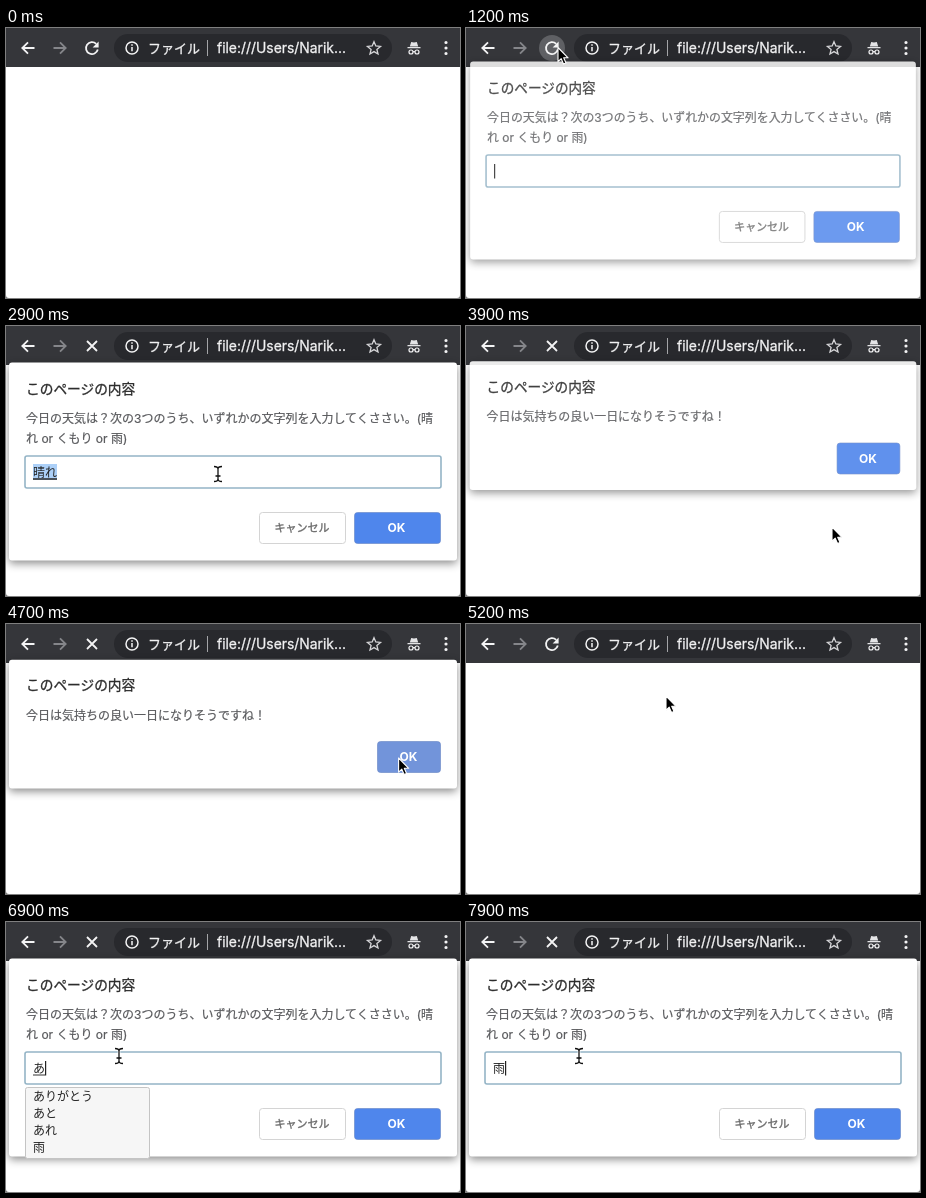
An HTML page that plays this animation: 454 by 270 pixels, repeating every 8000 ms.

```html
<!DOCTYPE html>
<html lang="ja">
<head>
<meta charset="utf-8">
<title>今日の天気</title>
<style>
html, body { margin: 0; width: 100%; height: 100%; overflow: hidden; background: #fff; }
svg { display: block; width: 454px; height: 270px; font-family: Inter, "Noto Sans CJK JP", "Noto Sans CJK", sans-serif; }
text { white-space: pre; }
.bar { fill: #f2f2f3; stroke: #f2f2f3; stroke-width: .3; }
.title { font-size: 13.7px; fill: #2c2c2c; stroke: #2c2c2c; stroke-width: .3; }
.body { font-size: 12px; fill: #58595c; stroke: #58595c; stroke-width: .2; }
.typed { font-size: 12px; fill: #222; }
.button { font-size: 12px; font-weight: 700; fill: #fff; text-anchor: middle; }
.cancel { font-size: 11px; fill: #6a6a6a; stroke: #6a6a6a; stroke-width: .35; text-anchor: middle; }
.panel { fill: #fff; filter: drop-shadow(0 3px 4.5px rgba(0,0,0,.45)); }
.line { fill: none; stroke: #f4f4f5; stroke-width: 1.8; }
.blue { stroke: #6584c4; stroke-opacity: .6; }
</style>
</head>
<body>
<svg viewBox="0 0 454 270">
  <rect width="454" height="270" fill="#fff"/>
  <path d="M0 267v3h3A3 3 0 0 1 0 267M454 267v3h-3A3 3 0 0 0 454 267" fill="#777"/>
  <g id="toolbar">
    <rect width="454" height="39" fill="#35363a"/>
    <rect x="108" y="6" width="278" height="28" rx="14" fill="#28292d"/>
    <path class="line" d="M28.5 20H16.5M22 14.3l-5.7 5.7 5.7 5.7"/>
    <path class="line" d="M47.5 20h12M54 14.3l5.7 5.7-5.7 5.7" style="stroke:#85868a"/>
    <circle id="hover" cx="86" cy="20" r="13" fill="#5f6064"/>
    <g id="reload">
      <path class="line" d="M90.2 15.8A6 6 0 1 0 91.8 21.6"/>
      <path d="M92.6 13.4v6h-6z" fill="#f4f4f5"/>
    </g>
    <path id="stop" class="line" d="M81 15l10 10M91 15L81 25"/>
    <circle class="line" cx="126" cy="20" r="6" style="stroke-width:1.5"/>
    <path class="line" d="M126 19v4.2M126 16.2v1.6" style="stroke-width:1.5"/>
    <text class="bar" x="142" y="24.7" font-size="13">ファイル</text>
    <path d="M201.5 12v16" stroke="#a4a5a8"/>
    <text class="bar" x="211" y="25" font-size="13.9">file:///Users/Narik...</text>
    <path class="line" d="M368 13.7l1.8 4.3 4.7.4-3.6 3 1.1 4.6-4-2.4-4 2.4 1.1-4.6-3.6-3 4.7-.4z" style="stroke:#d6d6d8;stroke-width:1.3"/>
    <path d="M403.8 18.4l1.4-4.4 2.8.6 2.8-.6 1.4 4.4zM401.5 19h13v1.2h-13z" fill="#e4e4e6"/>
    <path class="line" d="M407 24a2 2 0 1 1-4 0a2 2 0 1 1 4 0q1-.8 2 0a2 2 0 1 1 4 0a2 2 0 1 1-4 0" style="stroke-width:1.2"/>
    <path d="M440 14.5h0M440 20h0M440 25.5h0" stroke="#f4f4f5" stroke-width="3.2" stroke-linecap="round"/>
  </g>

  <g id="ask">
    <rect class="panel" x="3" y="36.5" width="448" height="198" rx="3"/>
    <text class="title" x="20" y="67.7">このページの内容</text>
    <text class="body" x="20" y="96.8">今日の天気は？次の3つのうち、いずれかの文字列を入力してくささい。(晴</text>
    <text class="body" x="20" y="116.8">れ or くもり or 雨)</text>
    <rect x="19" y="130" width="416" height="32" rx="2" fill="#fff" stroke="#94b4c6" stroke-width="1.6"/>
    <rect id="mark" x="27" y="138" height="16" fill="#acd0f8"/>
    <text id="typed" class="typed" x="27" y="150.5"></text>
    <path id="under" stroke="#333"/>
    <path id="caret" d="M0 139v14.5" stroke="#222" stroke-width="1.2"/>
    <rect x="253.5" y="186.5" width="86" height="31" rx="3" fill="#fff" stroke="#d4d4d4"/>
    <text class="cancel" x="296" y="206">キャンセル</text>
    <rect class="blue" x="348.5" y="186.5" width="86" height="31" rx="3" fill="#4f86ec"/>
    <text class="button" x="390.5" y="206.3">OK</text>
    <g id="list">
      <rect x="19.5" y="165.5" width="124" height="71" rx="2" fill="#f6f6f6" stroke="#c4c4c4"/>
      <text class="typed" x="27" y="179"></text>
      <text class="typed" x="27" y="196"></text>
      <text class="typed" x="27" y="213"></text>
      <text class="typed" x="27" y="230"></text>
    </g>
  </g>

  <g id="reply">
    <rect class="panel" x="3" y="35.7" width="448" height="128.8" rx="3"/>
    <text class="title" x="20" y="66.3">このページの内容</text>
    <text class="body" x="20" y="95.7">今日は気持ちの良い一日になりそうですね！</text>
    <rect id="ok" class="blue" x="371.5" y="117.5" width="63" height="31" rx="3"/>
    <text class="button" x="402.5" y="137.2">OK</text>
  </g>

  <g id="arrow"><path d="M0 0V14.2l3.2-3 2.3 5.3 2.5-1.1-2.3-5.1h4.4z" fill="#000" stroke="#fff" stroke-width="1.1" stroke-linejoin="round"/></g>
  <g id="beam" fill="none">
    <path d="M-4-7.5q4 0 4 2.5q0-2.5 4-2.5M-4 7.5q4 0 4-2.5q0 2.5 4 2.5M0-5V5M-2.5 2h5" stroke="#fff" stroke-width="2.6"/>
    <path d="M-4-7.5q4 0 4 2.5q0-2.5 4-2.5M-4 7.5q4 0 4-2.5q0 2.5 4 2.5M0-5V5M-2.5 2h5" stroke="#111" stroke-width="1.3"/>
  </g>
</svg>
<script>
const LOOP = 8000, STEP = 100;
const $ = id => document.getElementById(id);

// time, x, y
const pointerPath = [
  [100, 232, 190], [400, 150, 90], [800, 92, 19.5], [1300, 92, 19.5], [1500, 130, 75],
  [1800, 223, 157], [2000, 212, 148], [3300, 212, 148], [3600, 290, 180], [3900, 366, 201],
  [4200, 366, 201], [4600, 392.6, 134], [4900, 392.6, 134], [5200, 200, 72], [5400, 92, 20],
  [5800, 92, 20], [5900, 98, 54], [6300, 114, 147], [6500, 113, 134]
];
// time, opacity
const askFade = [[1000, 0], [1200, .83], [1400, 1], [3200, 1], [3500, 0], [5400, 0], [5700, 1]];
const replyFade = [[3600, 0], [3900, .9], [4000, 1], [4700, 1], [5000, 0]];
// time, text, state
const typing = [
  [0, '', 'idle'], [1900, '', 'blink'],
  [2400, 'h', 'kana'], [2500, 'は', 'kana'], [2600, 'はr', 'kana'], [2700, 'はれ', 'kana'],
  [2800, '晴れ', 'pick'], [3000, '晴れ', 'idle'], [5000, '', 'idle'],
  [6900, 'あ', 'kana'], [7400, 'あm', 'kana'], [7500, 'あめ', 'kana'],
  [7700, '雨', 'pick'], [7900, '雨', 'idle']
];
const words = {
  'h': 'は ほ ひ へ', 'は': 'はい 春 話 晴れ', 'はr': '春 晴れ 腹 針', 'はれ': '晴れ はれ ハレ 腫れ',
  'あ': 'ありがとう あと あれ 雨', 'あm': '雨 網 編み 甘い', 'あめ': '雨 飴 あめ アメ'
};

function track(keys, t) {
  if (t <= keys[0][0]) return keys[0].slice(1);
  const i = keys.findIndex(k => k[0] > t);
  if (i < 0) return keys[keys.length - 1].slice(1);
  const a = keys[i - 1], b = keys[i], p = (t - a[0]) / (b[0] - a[0]);
  return a.slice(1).map((v, n) => v + (b[n + 1] - v) * p);
}

function show(id, on) { $(id).style.display = on ? '' : 'none'; }

function place(id, x, y) { $(id).setAttribute('transform', `translate(${x} ${y})`); }

function fade(id, a, drop) {
  show(id, a > 0);
  const s = 1 - (1 - a) * .03;
  $(id).setAttribute('opacity', a);
  $(id).setAttribute('transform', `translate(${227 * (1 - s)} ${-(1 - a) * drop}) scale(${s} 1)`);
}

function drawInput(t) {
  const [, text, state] = typing.filter(k => k[0] <= t).pop();
  const wide = [...text].reduce((w, c) => w + (c < '\u0080' ? (c === 'm' ? 10.5 : c === 'h' ? 7.3 : 4.7) : 12), 0);
  $('typed').textContent = text;
  show('mark', state === 'pick');
  $('mark').setAttribute('width', wide);
  show('under', state === 'kana' || state === 'pick');
  $('under').setAttribute('d', `M27 153h${wide}`);
  $('under').setAttribute('stroke-width', state === 'pick' ? 1.6 : 1);
  show('caret', state === 'idle' || state === 'kana');
  place('caret', 27.6 + wide, 0);
  show('list', state === 'kana');
  const items = (words[text] || '').split(' ');
  $('list').querySelectorAll('text').forEach((el, i) => el.textContent = items[i] || '');
}

function draw(t) {
  const [ask] = track(askFade, t), [reply] = track(replyFade, t), [x, y] = track(pointerPath, t);
  fade('ask', ask, 18);
  fade('reply', reply, 5);
  drawInput(t);

  const onReload = t > 0 && Math.hypot(x - 86, y - 20) < 14;
  const loading = t >= 900 && t < 4900 || t >= 5400;
  show('hover', onReload);
  show('stop', loading && !onReload);
  show('reload', !loading || onReload);
  $('ok').setAttribute('fill', x > 371 && y > 117 && y < 149 ? '#7294da' : '#4f86ec');

  const onInput = ask > .5 && y >= 130 && y <= 162;
  show('arrow', t > 0 && !onInput);
  show('beam', t > 0 && onInput);
  place('arrow', x, y);
  place('beam', x, y);
}

function tick() {
  draw(Math.floor(performance.now() % LOOP / STEP) * STEP);
  requestAnimationFrame(tick);
}
tick();
</script>
</body>
</html>
```
